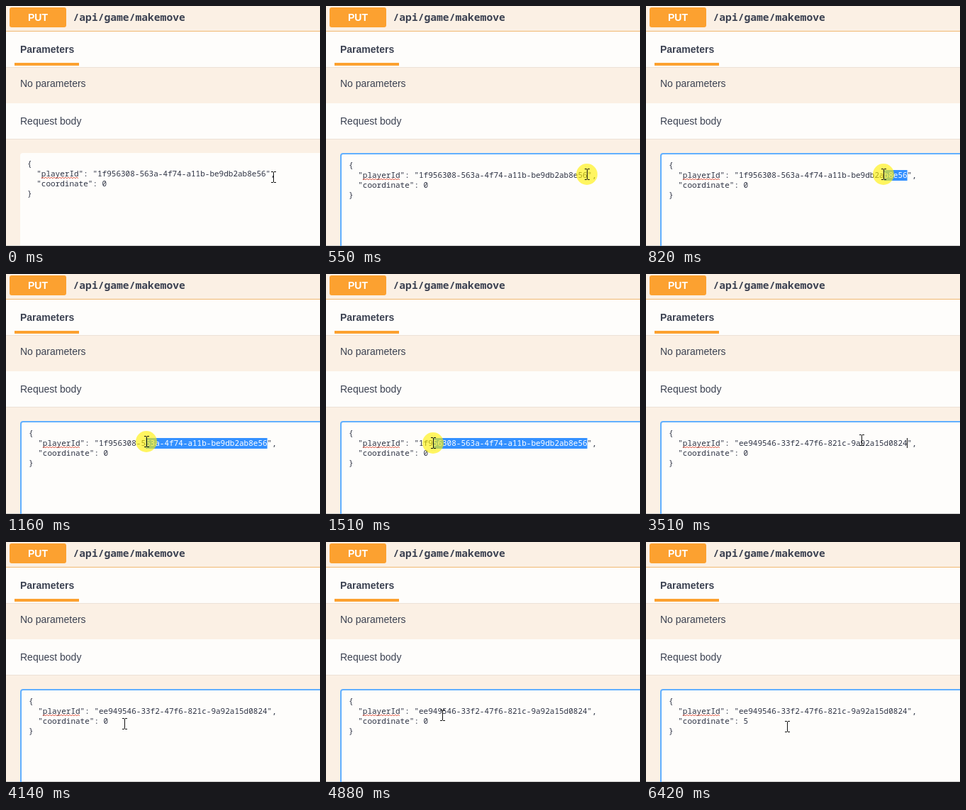
An HTML page that plays this animation: 443 px wide and 338 px high, repeating every 6490 ms.

```html
<!DOCTYPE html>
<html lang="en">
<head>
<meta charset="utf-8">
<title>makemove request</title>
<style>
  html, body { margin: 0; width: 100%; height: 100%; overflow: hidden; background: #fbf0e4; }
  svg { display: block; width: 443px; height: 338px; }
  text { font: 14px "Liberation Sans", Arial, sans-serif; fill: #3b4151; }
  .bold { font-weight: 700; }
  .path { font: 600 14.667px "Noto Sans Mono", "DejaVu Sans Mono", monospace; }
  .code text { font: 500 11px "Noto Sans Mono", "DejaVu Sans Mono", monospace; fill: #2e3344; }
  .code .picked { fill: #fff; }
  .panel { fill: #fefdfb; }
  .edge { fill: #ece2d7; }
  .accent { fill: #fca130; }
</style>
</head>
<body>
<svg viewBox="0 0 443 338">
  <rect width="443" height="338" fill="#fbf0e4"/>

  <rect class="accent" x="5" y="2" width="80" height="28" rx="3"/>
  <text class="bold" x="45" y="21" text-anchor="middle" style="fill:#fff">PUT</text>
  <text class="path" x="94.5" y="21">/api/game/makemove</text>
  <rect y="35" width="443" height="1" fill="#f0b972"/>

  <rect class="panel" y="36" width="443" height="50"/>
  <rect class="edge" y="86" width="443" height="1"/>
  <text class="bold" x="20" y="66">Parameters</text>
  <rect class="accent" x="12" y="80" width="91" height="4"/>
  <text x="20" y="114">No parameters</text>

  <rect class="panel" y="137" width="443" height="50"/>
  <rect class="edge" y="187" width="443" height="1"/>
  <text x="20" y="167">Request body</text>

  <rect class="panel" x="20" y="207" width="440" height="150" rx="4"/>
  <rect y="337" width="443" height="1" fill="#c9c8c7"/>
  <rect id="focus" x="21" y="208" width="440" height="150" rx="3" fill="none" stroke="#61affe" stroke-width="2"/>

  <g class="code" id="code">
    <text x="32" y="228">{</text>
    <text x="45.2" y="242">"playerId": "<tspan id="player"></tspan>",</text>
    <text x="45.2" y="256">"coordinate": <tspan id="coord"></tspan></text>
    <text x="32" y="270">}</text>
    <path id="wave" fill="none" stroke="#e0503c"/>
    <g id="selection">
      <rect id="band" y="231" height="15" fill="#3390ff"/>
      <text class="picked" id="picked" y="242"></text>
    </g>
    <rect id="caret" width="1" height="14" fill="#111"/>
  </g>

  <g id="pointer">
    <circle id="press" r="15" fill="#fff000" fill-opacity=".62"/>
    <path d="M-3-8h3v1h-3zM1-8h3v1h-3zM0-7h1v14h-1zM-3 7h3v1h-3zM1 7h3v1h-3z" fill="#111"/>
  </g>
</svg>

<script>
const LOOP = 6490, TICK = 67, BLINK = 530, LEFT = 32, CHAR = 6.6;
const FIRST = 15, LAST = 51;   // columns of the id value
const OLD_ID = '1f956308-563a-4f74-a11b-be9db2ab8e56';
const NEW_ID = 'ee949546-33f2-47f6-821c-9a92a15d0824';
const FOCUS = 550, RELEASE = 2550, PASTE = 3510, CLICK = 4340, UNCLICK = 4480, ERASE = 5560, TYPE = 5890;

const speedUp = p => p * p;
const slowDown = p => p * (2 - p);
const smooth = p => p * p * (3 - 2 * p);

const home = { x: 377, y: 241 };
const moves = [
  { from: 0, to: 280, x: 368, y: 237, ease: slowDown },
  { from: FOCUS, to: 1160, x: 198, y: 236, ease: speedUp },
  { from: 1160, to: 1860, x: 134, y: 239, ease: slowDown },
  { from: RELEASE, to: 3240, x: 312, y: 232, ease: smooth },
  { from: 3440, to: PASTE, x: 304, y: 234, ease: smooth },
  { from: PASTE, to: 4140, x: 167, y: 256, ease: smooth },
  { from: UNCLICK, to: 4680, x: 164, y: 244, ease: smooth },
  { from: 6220, to: 6420, x: 199, y: 260, ease: smooth }
];

const el = {};
for (const node of document.querySelectorAll('[id]')) el[node.id] = node;
const colX = col => LEFT + col * CHAR;
const within = (t, a, b) => t >= a && t < b;
const show = (node, on) => node.setAttribute('visibility', on ? 'visible' : 'hidden');
const write = (node, s) => { if (node.textContent !== s) node.textContent = s; };
const set = (node, attrs) => {
  for (const name in attrs) node.setAttribute(name, attrs[name]);
};

set(el.wave, { d: `M${colX(3)} 245` + 'l2-2 2 2'.repeat(13) });

// The pointer advances in ticks, like a screen recording
function pointerAt(t) {
  let { x, y } = home;
  for (const m of moves) {
    if (t < m.from) break;
    const ticked = Math.floor((t - m.from) / TICK) * TICK;
    const p = t >= m.to ? 1 : m.ease(ticked / (m.to - m.from));
    x += (m.x - x) * p;
    y += (m.y - y) * p;
  }
  return [Math.round(x), Math.round(y)];
}

// The blink restarts with each edit
function drawCaret(t) {
  const since = [TYPE, ERASE, CLICK, PASTE].find(edit => t >= edit);
  show(el.caret, since && (t - since) % (2 * BLINK) < BLINK);
  const col = since === PASTE ? LAST : since === ERASE ? 16 : 17;
  set(el.caret, { x: Math.floor(colX(col)), y: since === PASTE ? 231 : 245 });
}

function drawSelection(t, x) {
  const near = t < RELEASE ? Math.round((x - LEFT) / CHAR) : FIRST;
  const col = Math.min(LAST, Math.max(FIRST, near));
  show(el.selection, within(t, FOCUS, PASTE));
  set(el.band, { x: colX(col), width: (LAST - col) * CHAR });
  set(el.picked, { x: colX(col) });
  write(el.picked, OLD_ID.slice(col - FIRST));
}

function draw(t) {
  const [x, y] = pointerAt(t);
  const focused = t >= FOCUS;
  show(el.focus, focused);
  set(el.code, { transform: focused ? '' : 'translate(-2 -2)' });
  write(el.player, t < PASTE ? OLD_ID : NEW_ID);
  write(el.coord, t < ERASE ? '0' : t < TYPE ? '' : '5');
  drawSelection(t, x);
  drawCaret(t);
  show(el.press, within(t, FOCUS, RELEASE) || within(t, CLICK, UNCLICK));
  set(el.pointer, { transform: `translate(${x} ${y})` });
}

let start;
function frame(now) {
  start ??= now;
  draw((now - start) % LOOP);
  requestAnimationFrame(frame);
}
draw(0);
requestAnimationFrame(frame);
</script>
</body>
</html>
```
